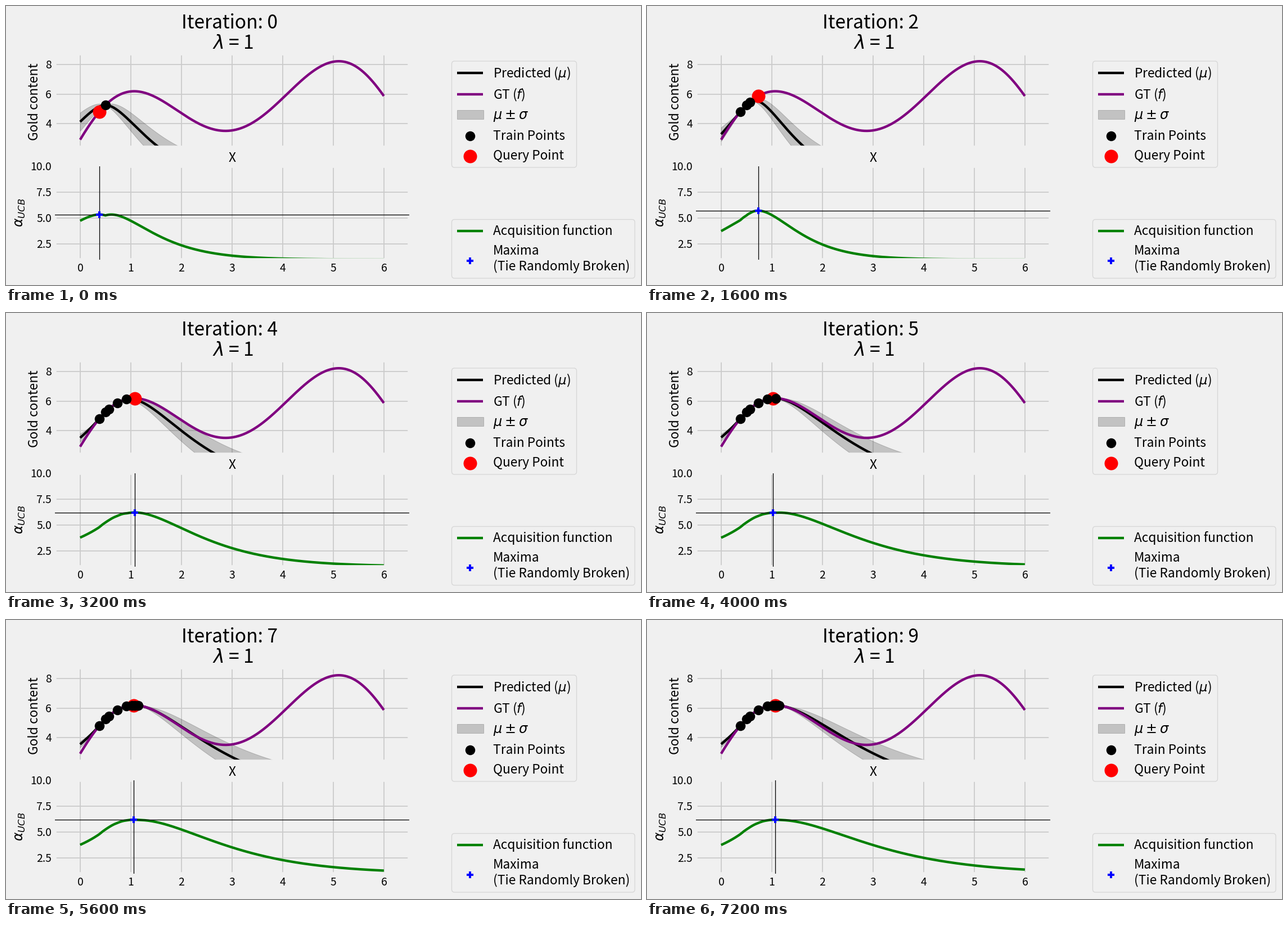
These frames come from a looping animation (1129 px wide and 496 px high, 8 s). A matplotlib script:

```python
import numpy as np
import matplotlib.pyplot as plt
from matplotlib.animation import FuncAnimation
from matplotlib.patches import FancyBboxPatch, Rectangle

W, H, DPI = 1129, 496, 128
PX = 72 / DPI  # points per pixel
BG = "#f0f0f0"
plt.rcParams["font.family"] = ["Noto Sans CJK JP", "DejaVu Sans"]
plt.rcParams["mathtext.fontset"] = "dejavusans"

# Hidden function: a degree 6 polynomial through a few points and extrema.
KNOTS = np.array([(0, 2.9), (0.38, 4.82), (0.5, 5.267), (0.731, 5.86), (1.07, 6.17),
                  (2, 4.72), (2.875, 3.48), (4, 5.74), (5.11, 8.22), (6, 5.87)])
EXTREMA = np.array([1.07, 2.875, 5.11])
powers = np.arange(7)
rows = np.vstack([KNOTS[:, :1] ** powers,
                  powers * EXTREMA[:, None] ** np.maximum(powers - 1, 0)])
coef = np.linalg.lstsq(rows, np.append(KNOTS[:, 1], [0, 0, 0]), rcond=None)[0]


def gold(x):
    return np.polyval(coef[::-1], x)


# The first sample, then the point queried in each iteration.
SAMPLES = np.array([0.5, 0.381, 0.564, 0.731, 0.917, 1.075,
                    1.028, 1.142, 1.057, 1.09, 1.073])
LENGTHS = [1, 0.48, 0.89, 1.17, 1.43, 1.62, 1.69, 1.75, 1.83, 1.9]
xs = np.linspace(0, 6, 601)


def matern(a, b, length):
    r = np.sqrt(3) * np.abs(a[:, None] - b[None, :]) / length
    return (1 + r) * np.exp(-r)


def posterior(train, length):
    K = matern(train, train, length) + 1e-10 * np.eye(len(train))
    k = matern(train, xs, length)
    solved = np.linalg.solve(K, k)
    var = 1 - np.sum(k * solved, axis=0)
    return solved.T @ gold(train), np.sqrt(np.clip(var, 0, None))


fig = plt.figure(figsize=(W / DPI, H / DPI), dpi=DPI, facecolor=BG)


def plot_axes(top, bottom, ylim, ticks):
    ax = fig.add_axes([86.8 / W, 1 - bottom / H, 630 / W, (bottom - top) / H], facecolor=BG)
    ax.set(xlim=(-0.5, 6.5), ylim=ylim, xticks=range(7), yticks=ticks)
    ax.set_axisbelow(True)
    ax.grid(color="#cbcbcb", lw=1.8 * PX)
    ax.tick_params(length=0, labelleft=False, labelbottom=False)
    for spine in ax.spines.values():
        spine.set(color=BG, lw=5.6 * PX)
    return ax


top = plot_axes(85.1, 250.6, (2.412, 8.729), [4, 6, 8])
low = plot_axes(285.1, 450.6, (1, 10), [2.5, 5, 7.5, 10])
page = fig.add_axes([0, 0, 1, 1], facecolor="none")
page.set(xlim=(0, W), ylim=(H, 0))
page.axis("off")


def write(x, y, text, size, ha="left", **kw):
    return page.text(x, y, text, fontsize=size * PX, ha=ha, va="baseline",
                     color="black", **kw)


def curve(ax, x, y, color):
    return ax.plot(x, y, color=color, lw=4.4 * PX, solid_capstyle="butt")[0]


def dots(ax, x, y, color, size, marker="o", z=4):
    return ax.plot(x, y, marker, color=color, ms=size * PX, mew=0, zorder=z)[0]


def legend_box(x, y, w, h):
    page.add_patch(FancyBboxPatch((x, y), w, h, boxstyle="round,pad=0,rounding_size=5",
                                  fc=BG, ec="#d6d6d6", lw=1.3 * PX))


# Titles, labels and tick numbers
LABEL, TICK, TITLE = 22.7, 19.4, 33.5
title = write(398, 39.5, "", TITLE, "center")
write(404, 76.5, r"$\lambda$ = 1", TITLE, "center")
write(402, 277, "X", LABEL, "center")
write(57, 170, "Gold content", LABEL, "center", rotation=90, rotation_mode="anchor")
write(31, 367, r"$\alpha_{UCB}$", 23.5, "center", rotation=90, rotation_mode="anchor")
for v in (4, 6, 8):
    write(81, 209 - 26.2 * (v - 4) + 7, str(v), TICK, "right")
for v in (2.5, 5.0, 7.5, 10.0):
    write(81, 450.6 - 18.39 * (v - 1) + 7.2, f"{v:.1f}", TICK, "right")
for v in range(7):
    write(132 + 90 * v, 472, str(v), TICK, "center")

# Legends
legend_box(792.5, 98, 222, 189)
legend_box(792.5, 379.5, 325.5, 104.5)
for y, color in ((119, "black"), (157, "purple"), (400, "green")):
    curve(page, [802, 848], [y, y], color)
page.add_patch(Rectangle((801.5, 184.5), 47, 16.5, color="black", alpha=0.19, lw=1 * PX))
dots(page, 825, 231, "black", 17.5)
dots(page, 825, 266.7, "red", 24)
dots(page, 825, 452.7, "blue", 12, "P")
for y, text in ((127, r"Predicted ($\mu$)"), (165, "GT ($f$)"), (238, "Train Points"),
                (273, "Query Point"), (407, "Acquisition function"),
                (442, "Maxima"), (470, "(Tie Randomly Broken)")):
    write(866, y, text, LABEL)
write(866, 201, r"$\mu \pm \sigma$", 24)

# Moving parts
band = top.fill_between(xs, xs, xs, color="black", alpha=0.19, lw=1 * PX)
mean_line = curve(top, xs, xs, "black")
curve(top, xs, gold(xs), "purple")
query_dot = dots(top, [], [], "red", 24, z=3)
train_dots = dots(top, [], [], "black", 17.5)
acq_line = curve(low, xs, xs, "green")
cross_v = low.axvline(0, color="black", lw=1.3 * PX, zorder=3)
cross_h = low.axhline(0, color="black", lw=1.3 * PX, zorder=3)
maximum = dots(low, [], [], "blue", 12, "P")


def update(i):
    train, query = SAMPLES[:i + 1], SAMPLES[i + 1]
    mu, sigma = posterior(train, LENGTHS[i])
    acq = mu + sigma
    best = np.interp(query, xs, acq)
    title.set_text(f"Iteration: {i}")
    mean_line.set_ydata(mu)
    band.set_verts([np.column_stack([np.append(xs, xs[::-1]),
                                     np.append(acq, (mu - sigma)[::-1])])])
    train_dots.set_data(train, gold(train))
    query_dot.set_data([query], [gold(query)])
    acq_line.set_ydata(acq)
    cross_v.set_xdata([query, query])
    cross_h.set_ydata([best, best])
    maximum.set_data([query], [best])


anim = FuncAnimation(fig, update, frames=10, init_func=lambda: None,
                     interval=800, repeat=True, repeat_delay=0, blit=False)
plt.show()
```
